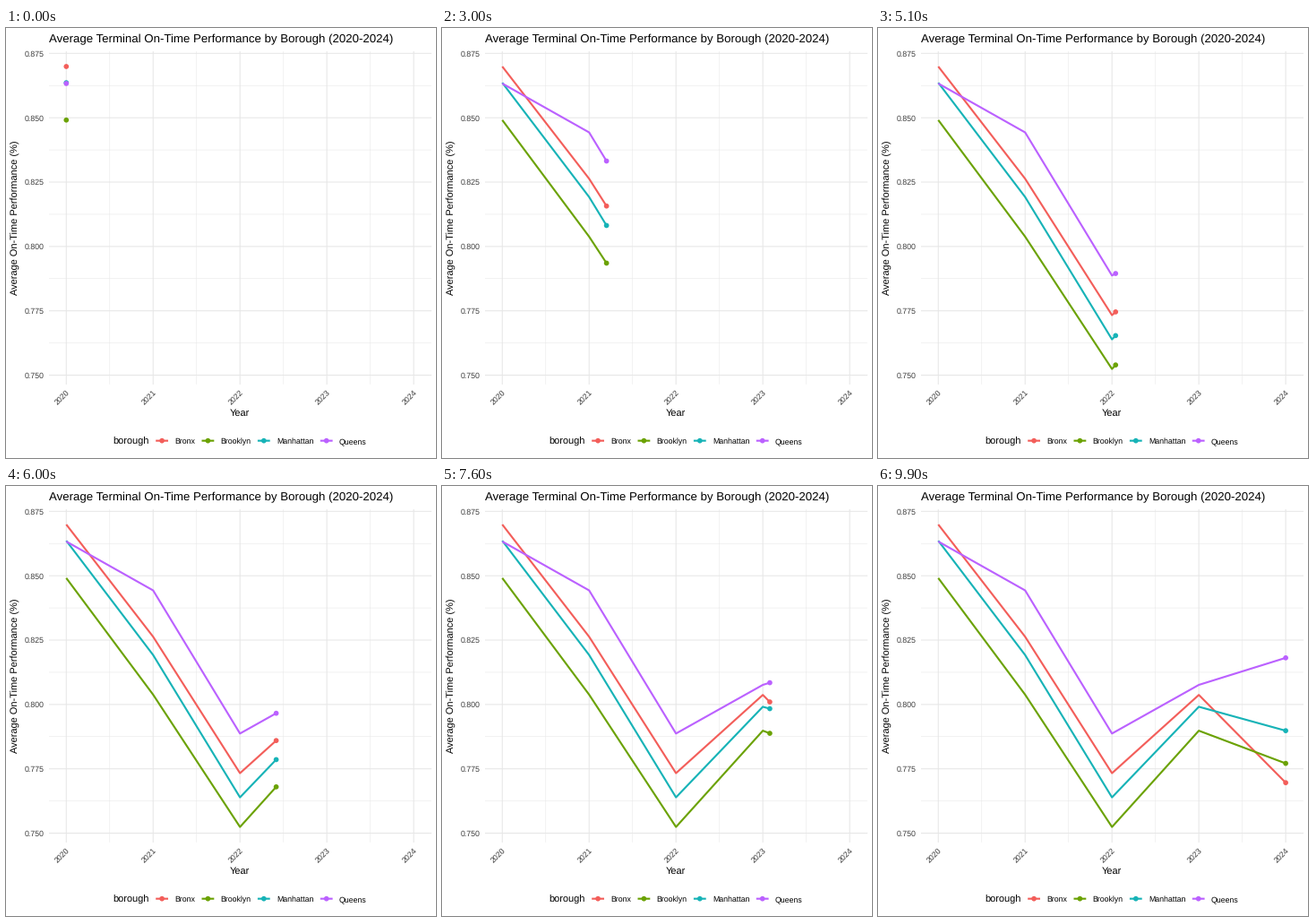
These frames come from a looping animation (480x480 px, 10 s). A matplotlib script:

```python
import matplotlib.pyplot as plt
import numpy as np
from matplotlib.animation import FuncAnimation

plt.rcParams.update({
    "font.family": "Liberation Sans",
    "text.hinting": "none",
    "path.snap": False,
})

SIZE, DPI = 480, 72  # at 72 dpi one point is one pixel
FRAMES, INTERVAL = 100, 100
GRID, LABEL = "#E7E7E7", "#3C3C3C"
LINE, DOT = 2.13, 5.7 ** 2

YEARS = np.arange(2020, 2025)
KEYS = [0, 25, 50, 74, 99]  # step at which each year is reached
RATES = {
    "Bronx": [.8699, .8263, .7733, .8037, .7696],
    "Brooklyn": [.8491, .8038, .7524, .7898, .7771],
    "Manhattan": [.8636, .8192, .7639, .7991, .7898],
    "Queens": [.8633, .8443, .7887, .8076, .8181],
}
COLORS = ["#F35E5A", "#6BA204", "#17B3B7", "#BB61FF"]

LEFT, RIGHT, TOP, BOTTOM = 47.9, 474.5, 26.1, 397.5
X_LIM, Y_LIM = (2019.8, 2024.2), (.746525, .875775)

fig = plt.figure(figsize=(SIZE / DPI, SIZE / DPI), dpi=DPI, facecolor="white")

# Page in pixel coordinates, y downwards, for text and legend
page = fig.add_axes([0, 0, 1, 1])
page.set(xlim=(0, SIZE), ylim=(SIZE, 0))
page.axis("off")

ax = fig.add_axes([LEFT / SIZE, 1 - BOTTOM / SIZE,
                   (RIGHT - LEFT) / SIZE, (BOTTOM - TOP) / SIZE])
ax.set(xlim=X_LIM, ylim=Y_LIM)
ax.axis("off")


def write(x, y, text, size, color="black", ha="left", angle=0):
    page.text(x, y, text, size=size, color=color, ha=ha, va="baseline",
              rotation=angle, rotation_mode="anchor")


def px(year):
    return np.interp(year, X_LIM, (LEFT, RIGHT))


def py(rate):
    return np.interp(rate, Y_LIM, (BOTTOM, TOP))


def draw_grid(xs, ys, width):
    for x in xs:
        ax.axvline(x, color=GRID, lw=width, zorder=1)
    for y in ys:
        ax.axhline(y, color=GRID, lw=width, zorder=1)


ticks = np.linspace(.75, .875, 6)
draw_grid(YEARS[:-1] + .5, ticks[:-1] + .0125, .53)
draw_grid(YEARS, ticks, 1.07)

write(47.9, 16, "Average Terminal On-Time Performance by Borough (2020-2024)", 13.2)
write((LEFT + RIGHT) / 2, 433, "Year", 11, ha="center")
write(13.5, (TOP + BOTTOM) / 2, "Average On-Time Performance (%)", 11,
      ha="center", angle=90)
for year in YEARS:
    write(px(year) + 4.4, 406.7, str(year), 8.8, LABEL, "right", 45)
for rate in ticks:
    write(43, py(rate) + 3.4, f"{rate:.3f}", 8.8, LABEL, "right")

# Legend
key_x, key_y = [174.1, 225.4, 287.8, 357.7], 460.7
write(119.6, 465, "borough", 11)
for x, name, color in zip(key_x, RATES, COLORS):
    page.plot([x - 6.9, x + 6.9], [key_y] * 2, color=color, lw=LINE,
              solid_capstyle="butt")
    write(x + 14.2, 464, name, 8.8)
page.scatter(key_x, [key_y] * 4, s=DOT, c=COLORS, linewidths=0, zorder=3)

lines = [ax.plot([], [], color=c, lw=LINE, solid_capstyle="butt",
                 solid_joinstyle="round", zorder=2)[0] for c in COLORS]
dots = ax.scatter([2020] * 4, [.8] * 4, s=DOT, c=COLORS, linewidths=0, zorder=3)


def update(step):
    now = np.interp(step, KEYS, YEARS)
    xs = np.append(YEARS[YEARS < now], now)
    heads = []
    for line, rates in zip(lines, RATES.values()):
        ys = np.interp(xs, YEARS, rates)
        line.set_data(xs, ys)
        heads.append((now, ys[-1]))
    dots.set_offsets(heads)
    return [*lines, dots]


anim = FuncAnimation(fig, update, frames=FRAMES, interval=INTERVAL,
                     repeat=True, repeat_delay=0)
plt.show()
```
